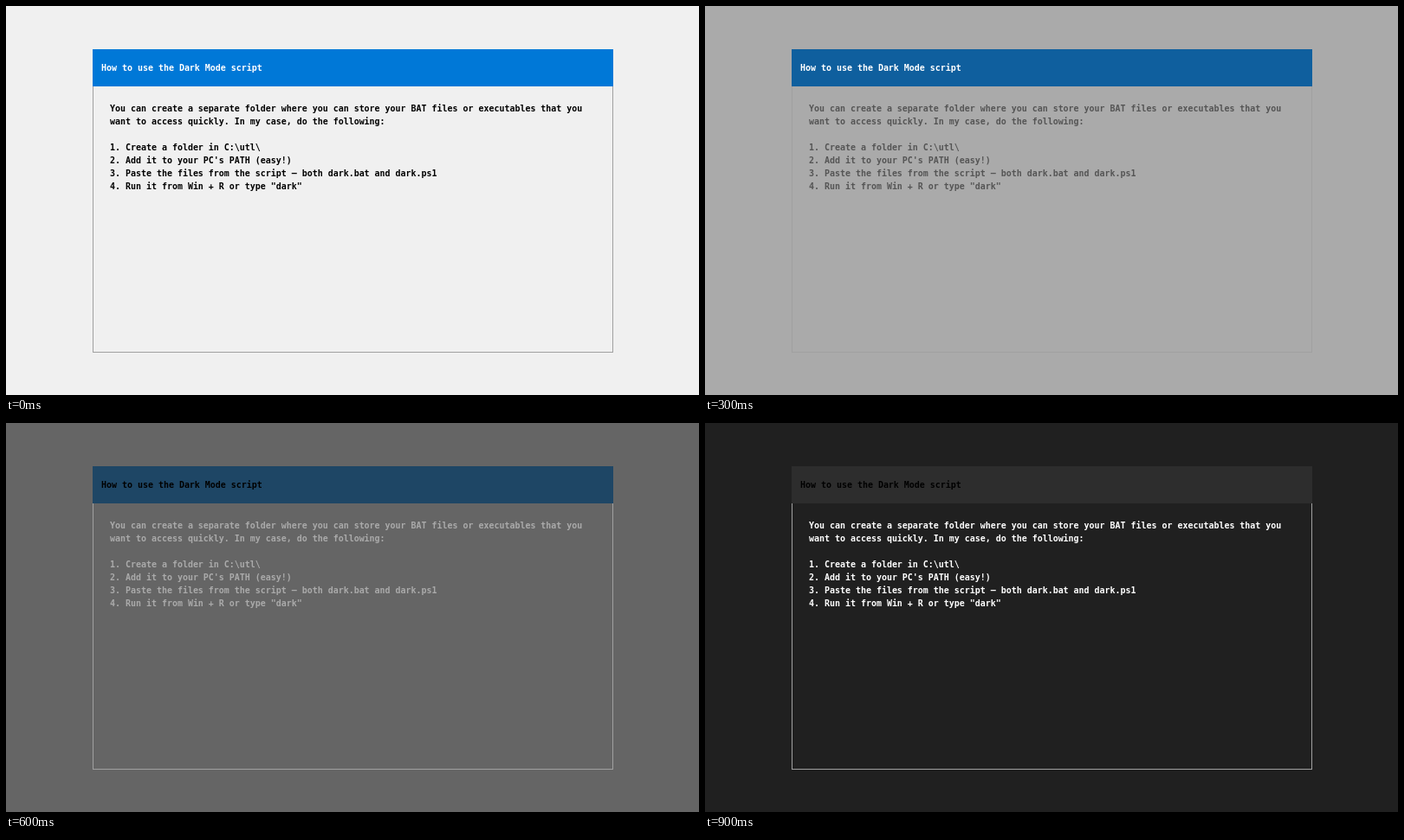
An HTML page that plays this animation: 800 px wide and 450 px high, repeating every 1000 ms.

```html
<!DOCTYPE html>
<html lang="en">
<head>
<meta charset="utf-8">
<title>Dark Mode script</title>
<style>
  html, body { margin: 0; width: 100%; height: 100%; overflow: hidden; }
  #window { position: absolute; left: 100px; top: 50px; width: 599px; height: 349px; border: 1px solid #a0a0a0; }
  #bar { position: absolute; left: 100px; top: 50px; width: 601px; height: 43px; }
  /* this size gives a 6px character pitch */
  pre { position: absolute; margin: 0; font: bold 9.966px/15px "DejaVu Sans Mono", monospace; }
  #title { left: 110px; top: 64px; }
  #text { left: 120px; top: 111px; }
</style>
</head>
<body>
<div id="window"></div>
<div id="bar"></div>
<pre id="title">How to use the Dark Mode script</pre>
<pre id="text">You can create a separate folder where you can store your BAT files or executables that you
want to access quickly. In my case, do the following:

1. Create a folder in C:\utl\
2. Add it to your PC's PATH (easy!)
3. Paste the files from the script – both dark.bat and dark.ps1
4. Run it from Win + R or type "dark"</pre>
<script>
  const STEPS = 10, STEP_MS = 100;
  const byId = id => document.getElementById(id);
  const bar = byId("bar"), title = byId("title"), text = byId("text");

  const mix = (from, to, k) =>
    `rgb(${from.map((c, i) => Math.floor(c + (to[i] - c) * k)).join()})`;
  const grey = v => [v, v, v];

  function draw(now) {
    const step = Math.floor(now / STEP_MS) % STEPS;
    const k = step / (STEPS - 1);
    document.body.style.background = mix(grey(240), grey(32), k);
    bar.style.background = mix([0, 120, 215], grey(45), k);
    text.style.color = mix(grey(0), grey(255), k);
    title.style.color = k < 0.5 ? "#fff" : "#000";
  }

  const start = performance.now();
  function loop() {
    draw(performance.now() - start);
    requestAnimationFrame(loop);
  }
  loop();
</script>
</body>
</html>
```
